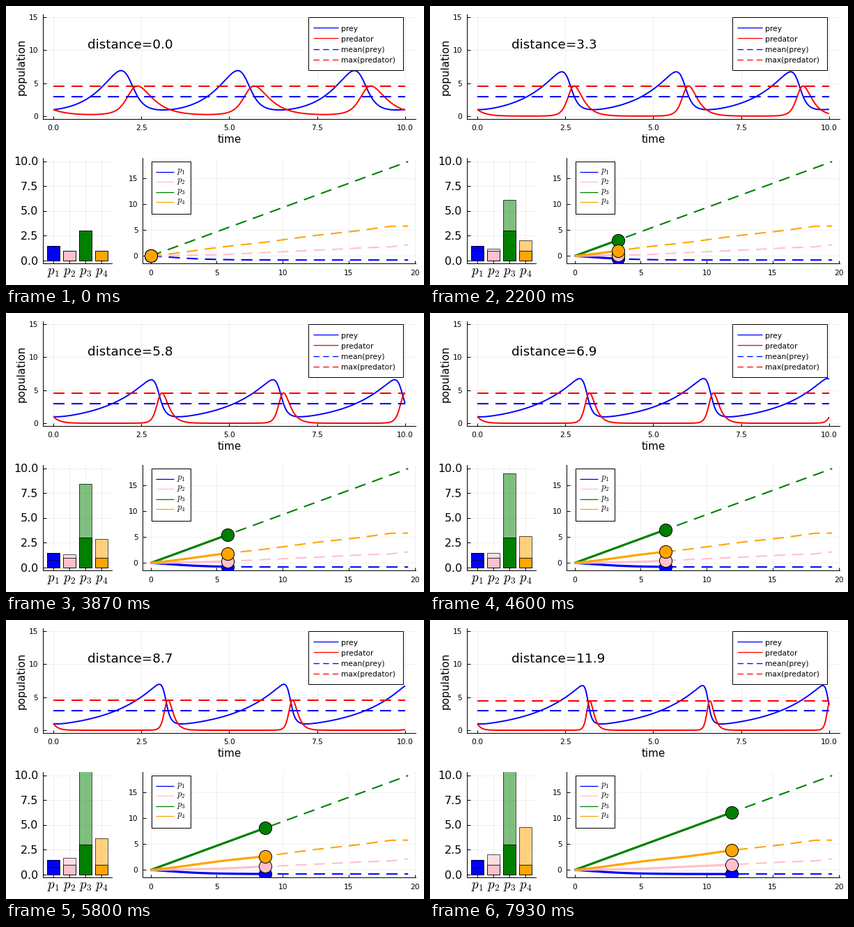
Animation of 600x400 px, one loop 8 s. Source, as a matplotlib script:

```python
import numpy as np
import matplotlib.pyplot as plt
from matplotlib.animation import FuncAnimation
from matplotlib.patches import Rectangle

W, H = 600, 400
PX = 0.72  # points per pixel at 100 dpi
FRAMES = 121
COLORS = ["blue", "pink", "green", "orange"]
DASH = (0, (7.7, 4.8))
KEY_DASH = (0, (6.4, 4.0))

plt.rcParams.update({
    "font.family": "DejaVu Sans",
    "mathtext.fontset": "cm",
    "lines.solid_capstyle": "butt",
})


def drift(d):
    """The four parameters after moving a distance d along the curve."""
    p1 = 1.5 - 0.775 * (1 - np.exp(-(d / 3.1) ** 1.4))
    p3 = 3 + 0.935 * d
    p4 = 1 + 0.314 * np.minimum(d, 18.2) - 0.05 * np.sin(0.9 * d)
    # p2 follows from the conserved quantity and the predator peak
    peak = 4.577 - 0.035 * np.clip(d - 8.7, 0, 3.3)
    p2 = (p1 * np.log(peak) - p3 + p3 * np.log(p3 / p4) + p4) / (peak - 1)
    return np.array([p1, p2, p3, p4])


def lotka_volterra(p, t_end=10, steps=1000):
    """RK4 solution for all parameter sets at once: (steps + 1, 2, sets)."""
    def rate(u):
        x, y = u
        return np.array([x * (p[0] - p[1] * y), y * (p[3] * x - p[2])])

    h = t_end / steps
    u = np.ones((2, p.shape[1]))
    out = [u]
    for _ in range(steps):
        k1 = rate(u)
        k2 = rate(u + h / 2 * k1)
        k3 = rate(u + h / 2 * k2)
        k4 = rate(u + h * k3)
        u = u + h / 6 * (k1 + 2 * k2 + 2 * k3 + k4)
        out.append(u)
    return np.array(out)


dist = np.minimum(np.arange(FRAMES) * 0.1, 11.9)
params = drift(dist)
base = params[:, 0]
offsets = params - base[:, None]

times = np.linspace(0, 10, 1001)
sol = lotka_volterra(params)
prey_mean = sol[:, 0].mean(axis=0)
pred_max = sol[:, 1].max(axis=0)

fig = plt.figure(figsize=(W / 100, H / 100), dpi=100, facecolor="white")


def panel(x0, y0, x1, y1, xlim, ylim, xticks, yticks):
    ax = fig.add_axes([x0 / W, 1 - y1 / H, (x1 - x0) / W, (y1 - y0) / H])
    ax.set(xlim=xlim, ylim=ylim, xticks=xticks, yticks=yticks)
    ax.tick_params(direction="in", length=4.5 * PX, width=PX,
                   labelbottom=False, labelleft=False)
    ax.spines[["top", "right"]].set_visible(False)
    ax.spines[["left", "bottom"]].set_linewidth(PX)
    ax.set_axisbelow(True)
    ax.grid(color="black", alpha=0.06, linewidth=PX)
    return ax


quarters = np.arange(0, 10.1, 2.5)
fives = range(0, 16, 5)
slots = range(1, 5)
top = panel(52.9, 11.7, 587.9, 162.3, (-0.3, 10.3), (-0.45, 15.45),
            quarters, fives)
bars = panel(53, 218.3, 151.5, 369.2, (0.36, 4.64), (-0.3, 10.3),
             slots, quarters)
path = panel(196.2, 218.3, 588, 369.2, (-0.6, 20.07), (-1.45, 18.87),
             range(0, 21, 5), fives)

# Pixel-space layer for text and legends
layer = fig.add_axes([0, 0, 1, 1], zorder=5)
layer.set(xlim=(0, W), ylim=(H, 0))
layer.axis("off")


def text(x, y, s, size, ha="left", va="baseline", **kw):
    return layer.text(x, y, s, fontsize=size * PX, ha=ha, va=va, **kw)


def legend(x, y, w, h, rows, key, first, step, drop, size):
    """Framed legend; key is (left, right, text) in x, rows are (name, color, style)."""
    layer.add_patch(Rectangle((x, y), w, h, facecolor="white",
                              edgecolor="black", linewidth=PX))
    left, right, label = key
    for i, (name, color, style) in enumerate(rows):
        line = first + step * i
        layer.plot([left, right], [line, line], color=color, ls=style, lw=0.95)
        text(label, line + drop, name, size)


SMALL, BIG = 10.6, 15.9
for v in quarters:
    text(68 + 50.47 * v, 178, f"{v:.1f}", SMALL, "center")
    text(46.3, 370.6 - 14.25 * v, f"{v:.1f}", BIG, "right")
for v in fives:
    text(46.3, 162 - 9.47 * v, str(v), SMALL, "right")
    text(189.5, 362.4 - 7.43 * v, str(v), SMALL, "right")
for v in range(0, 21, 5):
    text(207.7 + 18.95 * v, 386, str(v), SMALL, "center")
for i in slots:
    text(45 + 23 * i, 385, f"$p_{i}$", 19, "center")
text(320.8, 195.6, "time", 15.1, "center")
text(22, 87.5, "population", 15.3, "center", "center", rotation=90)
readout = text(117, 60.7, "", 18.4)

legend(434, 16, 136, 76,
       [("prey", "blue", "-"), ("predator", "red", "-"),
        ("mean(prey)", "blue", KEY_DASH), ("max(predator)", "red", KEY_DASH)],
       (441, 477, 481.5), 31.2, 15.2, 4.4, SMALL)
legend(209, 223, 56, 75,
       [(f"$p_{i}$", c, "-") for i, c in zip(slots, COLORS)],
       (214.5, 240.5, 244.7), 237.8, 14.5, 0.8, 12.8)

# Moving parts
prey_line, = top.plot([], [], color="blue", lw=1.4)
pred_line, = top.plot([], [], color="red", lw=1.4)
mean_line, = top.plot([0, 10], [0, 0], color="blue", ls=DASH, lw=1.5)
max_line, = top.plot([0, 10], [0, 0], color="red", ls=DASH, lw=1.5)

outline = dict(facecolor="none", linewidth=PX, zorder=4)
bars.bar(slots, base, color=COLORS, zorder=2)
live = bars.bar(slots, base, color=COLORS, alpha=0.5, zorder=3)
rims = bars.bar(slots, base, edgecolor=(0, 0, 0, 0.65), **outline)
bars.bar(slots, base, edgecolor=(0, 0, 0, 0.8), **outline)

reach = np.linspace(0, 19.5, 200)
for curve, start, color in zip(drift(reach), base, COLORS):
    path.plot(reach, curve - start, color=color, ls=DASH, lw=1.5)
trails = [path.plot([], [], color=c, lw=2.3, zorder=3)[0] for c in COLORS]
dots = [path.plot([], [], "o", ms=18.2 * PX, mfc=c, mec="black", mew=PX,
                  zorder=4)[0] for c in COLORS]


def update(n):
    prey_line.set_data(times, sol[:, 0, n])
    pred_line.set_data(times, sol[:, 1, n])
    mean_line.set_ydata([prey_mean[n]] * 2)
    max_line.set_ydata([pred_max[n]] * 2)
    readout.set_text(f"distance={dist[n]:.1f}")
    for i in range(4):
        live[i].set_height(params[i, n])
        rims[i].set_height(params[i, n])
        trails[i].set_data(dist[:n + 1], offsets[i, :n + 1])
        dots[i].set_data([dist[n]], [offsets[i, n]])
    return []


anim = FuncAnimation(fig, update, frames=FRAMES, interval=8000 / FRAMES,
                     init_func=lambda: update(0), repeat=True, repeat_delay=0)
plt.show()
```
